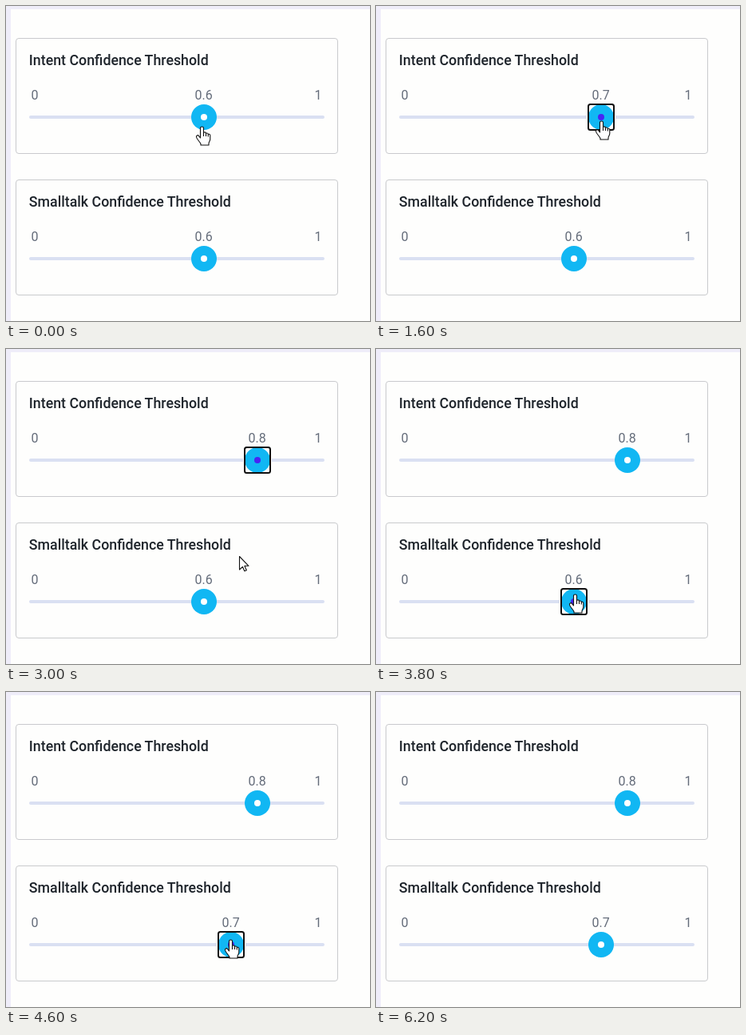
These frames come from a looping animation (456 px wide and 394 px high, 6400 ms). An HTML page:

```html
<!DOCTYPE html>
<html lang="en">
<head>
<meta charset="utf-8">
<title>Confidence thresholds</title>
<style>
  html, body { margin: 0; width: 100%; height: 100%; overflow: hidden; background: #fefefd; }
  svg { display: block; width: 456px; height: 394px; }
  text { font-family: Roboto, Arial, sans-serif; }
  .title { font-size: 17.8px; font-weight: 500; fill: #1e242b; }
  .label { font-size: 16px; fill: #646c7a; text-anchor: middle; }
</style>
</head>
<body>
<svg id="stage" viewBox="0 0 456 394">
  <rect width="456" height="394" fill="#efedf9"/>
  <rect x="6" y="4" width="450" height="390" fill="#fefefd"/>
</svg>
<script>
const LOOP = 6400, TICK = 200, SLIDE = 400;
const stage = document.getElementById('stage');

function add(parent, tag, attrs, text) {
  const node = document.createElementNS('http://www.w3.org/2000/svg', tag);
  for (const key in attrs) node.setAttribute(key, attrs[key]);
  if (text) node.textContent = text;
  parent.appendChild(node);
  return node;
}

const show = (node, on) => node.setAttribute('visibility', on ? 'visible' : 'hidden');
const place = (node, x, y) => node.setAttribute('transform', `translate(${x} ${y})`);
const valueToX = value => 45 + value * 338;

// steps: [time, value] changes; focus: [from, to]
function makeSlider(top, title, steps, focus) {
  const card = add(stage, 'g', { transform: `translate(0 ${top})` });
  add(card, 'rect', { x: 12.5, y: .5, width: 403, height: 144, rx: 3.5, fill: 'none', stroke: '#c9cacd' });
  add(card, 'text', { class: 'title', x: 28.8, y: 34 }, title);
  add(card, 'text', { class: 'label', x: 36, y: 77 }, '0');
  add(card, 'text', { class: 'label', x: 391, y: 77 }, '1');
  add(card, 'rect', { x: 29, y: 97, width: 370, height: 4, rx: 2, fill: '#dae0f2' });

  const knob = add(card, 'g', {});
  const label = add(knob, 'text', { class: 'label', x: -.3, y: -22 }, '0.6');
  const halo = add(knob, 'rect', { x: -18, y: -18, width: 36, height: 36, rx: 4, fill: '#fefefd' });
  add(knob, 'circle', { r: 16, fill: '#11b7f3' });
  const dot = add(knob, 'circle', { r: 4 });
  const ring = add(knob, 'rect', {
    x: -16, y: -16, width: 32, height: 32, rx: 2.5, fill: 'none', stroke: '#101010', 'stroke-width': 2
  });

  return t => {
    let value = .6, x = valueToX(value);
    for (const [start, next] of steps) {
      if (t < start) break;
      const left = 1 - Math.min(1, (t - start) / SLIDE);
      x += (valueToX(next) - x) * (1 - left ** 3);
      value = next;
    }
    const focused = t >= focus[0] && t < focus[1];
    place(knob, Math.round(x), 99);
    label.textContent = value.toFixed(1);
    dot.setAttribute('fill', focused ? '#4724f5' : '#fff');
    show(ring, focused);
    show(halo, focused);
  };
}

const sliders = [
  makeSlider(40, 'Intent Confidence Threshold', [[1090, .7], [2097, .8]], [600, 3800]),
  makeSlider(217, 'Smalltalk Confidence Threshold', [[4162, .7]], [3800, 6200])
];

const outline = { fill: '#fff', stroke: '#111', 'stroke-width': 1.1, 'stroke-linejoin': 'round' };
const hand = add(stage, 'g', outline);
add(hand, 'path', {
  d: 'M-2.5 14V1.8C-2.5-.6 1.5-.6 1.5 1.8V8C1.5 6.4 4.5 6.4 4.5 8.4V9C4.5 7.4 7.3 7.6 7.3 9.6V10.2' +
     'C7.3 8.8 9.8 9 9.8 11V15.5C9.8 18 8 19 8 21V23H-2V21.5C-3 19-6 16.5-7.3 13.6C-8.4 11-5.6 9.8-4.4 11.6Z'
});
add(hand, 'path', { d: 'M1.5 8V12M4.5 9V12M7.3 10.2V12.5', fill: 'none' });
const arrow = add(stage, 'path', { ...outline, d: 'M.5.5V17L4.4 13.3L6.8 18.8L9.3 17.7L6.9 12.3H12Z' });

// Pointer path: [time, x, y]
const path = [
  [0, 246, 151], [400, 247, 146], [1000, 264, 145], [2000, 296, 143], [2200, 308, 143],
  [2400, 312, 144], [2600, 313, 146], [3000, 292, 259], [3400, 256, 303], [3600, 249, 306],
  [3800, 250, 307], [4000, 258, 308], [4200, 274, 309], [4600, 282, 310], [5200, 282, 310],
  [5400, 286, 330]
];

function movePointer(t) {
  const i = path.findIndex(p => p[0] >= t);
  const visible = i >= 0;
  let overSlider = false;
  if (visible) {
    const b = path[i], a = path[Math.max(0, i - 1)];
    const k = b === a ? 0 : (t - a[0]) / (b[0] - a[0]);
    const x = Math.round(a[1] + (b[1] - a[1]) * k);
    const y = Math.round(a[2] + (b[2] - a[2]) * k);
    overSlider = y < 160 || y > 296;
    place(hand, x, y);
    place(arrow, x, y);
  }
  show(hand, visible && overSlider);
  show(arrow, visible && !overSlider);
}

function draw() {
  const t = Math.floor(performance.now() % LOOP / TICK) * TICK;
  sliders.forEach(update => update(t));
  movePointer(t);
  requestAnimationFrame(draw);
}
draw();
</script>
</body>
</html>
```
